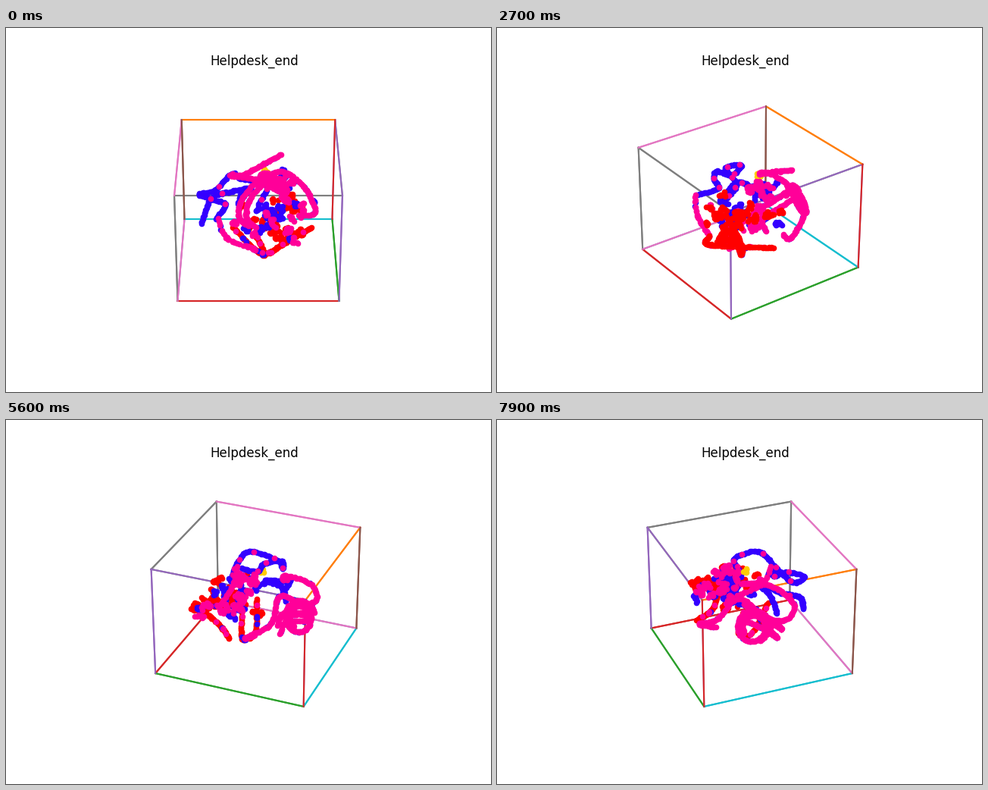
These frames come from a looping animation (640x480 px, 8 s). A matplotlib script:

```python
from itertools import product

import numpy as np
import matplotlib.pyplot as plt
from matplotlib.animation import FuncAnimation

FRAMES, STEP, ELEV = 80, 2, 30
HALF = np.array([103.8, 103.8, 77.8])
LIM = 1.1 * 25 / 24
COLORS = {"blue": "#3300ff", "pink": "#ff0099", "red": "#ff0000", "yellow": "#ffcc00"}

rng = np.random.default_rng(7)
cloud = {name: [] for name in COLORS}


def spline(pts, gap=1.6):
    """Catmull-Rom curve through pts, sampled about every `gap` units."""
    p = np.array(pts, float)
    p = np.vstack([2 * p[0] - p[1], p, 2 * p[-1] - p[-2]])
    out = []
    for a, b, c, d in zip(p, p[1:], p[2:], p[3:]):
        n = max(2, int(np.linalg.norm(c - b) / gap))
        t = np.linspace(0, 1, n, endpoint=False)[:, None]
        out.append(0.5 * (2 * b + (c - a) * t + (2 * a - 5 * b + 4 * c - d) * t**2
                          + (3 * b - a - 3 * c + d) * t**3))
    return np.vstack(out)


def spiral(center, azim, r0, r1, turns):
    """Spiral lying in the plane that faces the camera at `azim`."""
    a, e = np.radians([azim, ELEV])
    right = np.array([-np.sin(a), np.cos(a), 0])
    up = np.array([-np.cos(a) * np.sin(e), -np.sin(a) * np.sin(e), np.cos(e)])
    t = np.linspace(0, 1, int(90 * turns))[:, None]
    r, phi = r0 + (r1 - r0) * t, 2 * np.pi * turns * t
    return center + r * (np.cos(phi) * right + np.sin(phi) * up)


def paint(path, **share):
    """Put dots of each colour on a random share of the path."""
    for name, part in share.items():
        keep = path[rng.random(len(path)) < part]
        cloud[name].append(keep + rng.normal(0, 0.4, keep.shape))


def pile(center, spread, clumps, **weight):
    """Scatter short random walks around a centre."""
    w = np.array(list(weight.values()))
    for _ in range(clumps):
        name = rng.choice(list(weight), p=w / w.sum())
        walk = rng.normal(0, 1.7, (8, 3)).cumsum(axis=0)
        cloud[name].append(center + rng.normal(0, spread, 3) + walk)


BLUE = dict(blue=1, pink=0.05)
PINK = dict(pink=1, blue=0.14)
RED = dict(red=0.9, pink=0.1, blue=0.09)

# blue: top loop, then the side loop
paint(spline([(38, 0, 26), (28, 10, 50), (23, -22, 57), (-12, -35, 45), (-12, -57, 21),
              (-2, -78, 20), (15, -60, 22), (20, -43, 17), (48, -56, 10)]), **BLUE)
paint(spline([(-5, -76, -27), (-21, -63, 2), (-20, -36, 14), (-6, -10, 26),
              (-25, -20, 14), (-28, -28, -12)]), **BLUE)

# pink: long ribbon, twin ovals, coil and the left fringe
paint(spline([(-46, 31, 56), (-32, -18, 34), (-59, -38, 17), (-74, -20, 6), (-62, 4, 10),
              (-42, 32, 32), (-42, 62, 7), (-12, 75, -13), (-16, 52, -22)]), **PINK)
oval = spline([(-48, 17, 11), (-65, -3, 2), (-55, -23, -19), (-25, -26, -29), (-22, -12, -42)])
for k in range(2):
    paint(oval + k * np.array([-8, 10, -6]), **PINK)
paint(spiral((-66, 22, 0), 142, 23, 13, 1.6), **PINK)
paint(spline([(51, -53, 18), (55, -42, -12), (59, -8, -26)]), pink=0.6, blue=0.14)

# red: bottom ribbon and the keel
paint(spline([(59, -8, -26), (77, 12, -22), (40, 37, -27), (11, 72, -22)]), **RED)
paint(spline([(16, -33, -20), (8, -8, -56), (20, 8, -60), (25, -2, -30)]), **RED)

# mixed heaps
pile((14, 35, 12), (14, 14, 7), 22, red=3, pink=2, blue=2)
pile((40, 0, 0), (12, 14, 9), 22, red=3, pink=2, blue=2)
pile((65, 40, -4), (6, 8, 7), 12, red=4, pink=1, blue=1)
pile((6, 33, 44), (9, 8, 5), 12, pink=3, blue=2)
pile((-8, 9, 57), 2, 1, yellow=1)

# stacking from back to front, by starting azimuth
ORDERS = [(0, "yellow red blue pink"), (14, "yellow blue red pink"),
          (42, "yellow blue pink red"), (68, "yellow pink blue red"),
          (96, "yellow red blue pink"), (150, "red blue pink yellow")]

# box edges in the order front, right, back, left: under and over colours
CORNERS = [(1, -1), (1, 1), (-1, 1), (-1, -1)]
TOP = ("C7 C7 C1 C6", "C7 C4 C1 C6")
BOTTOM = ("C3 C2 C9 C4", "C3 C2 C9 C6")
POSTS = ("C7 C4 C4 C5", "C7 C4 C3 C5")

fig = plt.figure(figsize=(6.4, 4.8), dpi=100)
ax = fig.add_subplot(projection="3d", computed_zorder=False)
ax.set_axis_off()
ax.set_title("Helpdesk_end", pad=6.72 - 1.44 + 1.44)

for layer, k in product(range(2), range(4)):
    (x0, y0), (x1, y1) = CORNERS[k], CORNERS[(k + 1) % 4]
    for z, names in ((1, TOP), (-1, BOTTOM)):
        ax.plot([x0, x1], [y0, y1], [z, z], color=names[layer].split()[k], zorder=1)
    ax.plot([x0, x0], [y0, y0], [-1, 1], color=POSTS[layer].split()[k], zorder=1)

dots = {}
for name, parts in cloud.items():
    xyz = np.vstack(parts) / HALF
    dots[name] = ax.scatter(*xyz.T, s=20, color=COLORS[name], depthshade=False)

ax.set(xlim=(-LIM, LIM), ylim=(-LIM, LIM), zlim=(-LIM, LIM))


def update(i):
    azim = STEP * i
    ax.view_init(elev=ELEV, azim=azim)
    order = [names for start, names in ORDERS if start <= azim][-1]
    for z, name in enumerate(order.split()):
        dots[name].set_zorder(3 + z)
    return list(dots.values())


anim = FuncAnimation(fig, update, frames=FRAMES, interval=100, repeat=True,
                     repeat_delay=0, blit=False)
plt.show()
```
